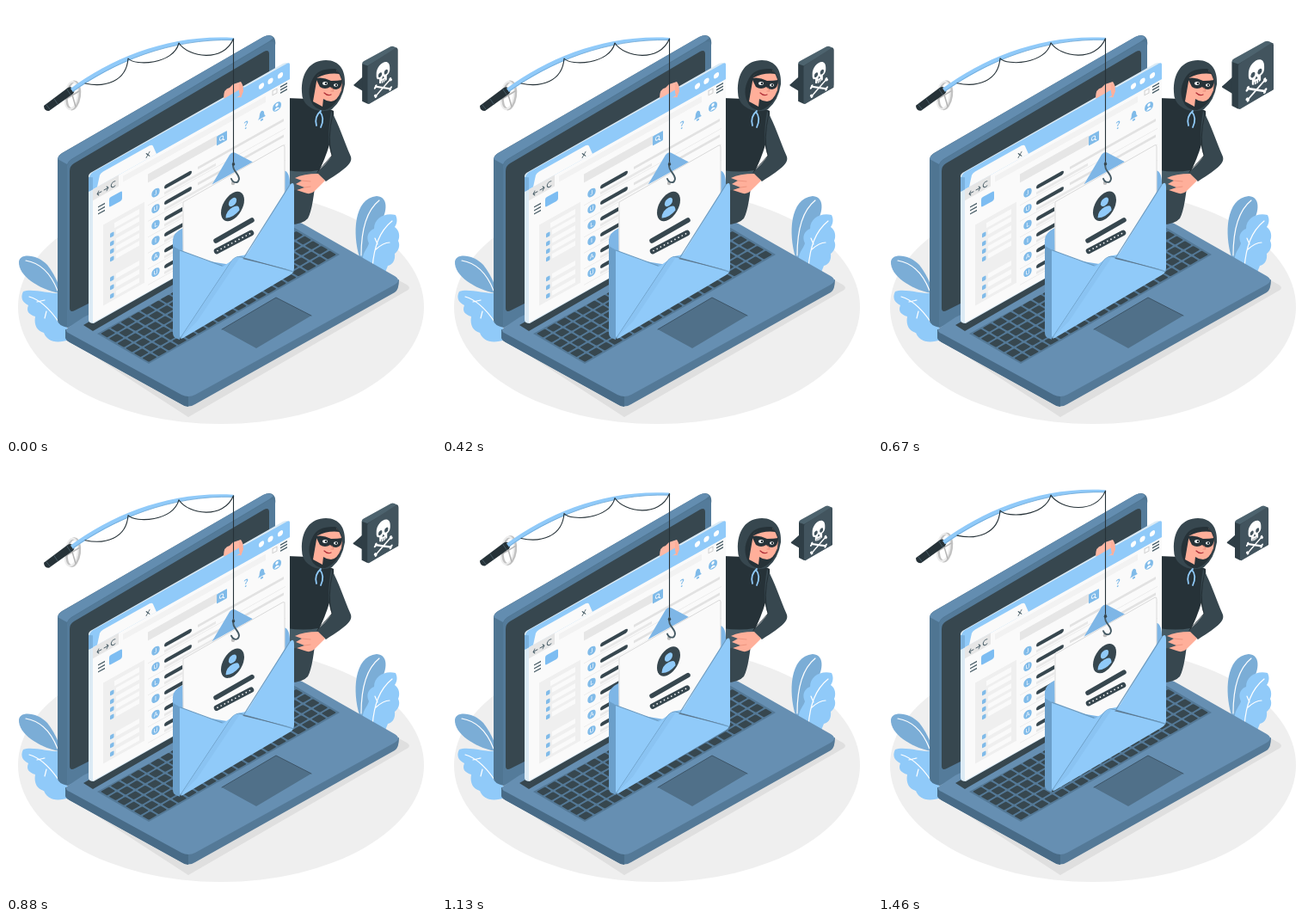
Animation of 500 by 500 pixels, one loop 1500 ms. Source, as an HTML page:

```html
<!DOCTYPE html>
<html lang="en">
<head>
<meta charset="utf-8">
<title>Phishing</title>
<style>
  html, body { margin: 0; width: 100%; height: 100%; overflow: hidden; background: #fff; }
  svg { display: block; width: 100vw; height: 100vh; }
  text { font-family: Lato, Arial, sans-serif; text-anchor: middle; }
  .line { fill: none; stroke-linecap: round; stroke-linejoin: round; }
</style>
</head>
<body>
<svg viewBox="0 0 500 500">
  <ellipse cx="250" cy="350" rx="236" ry="136" fill="#efefef"/>
  <path d="M70 386L212 478L466 331Q472 328 466 324L440 310Z" fill="#dfdfdf"/>

  <g id="plants">
    <path d="M62 334C38 329 14 314 15 297C17 286 38 290 48 301Q56 311 62 326Z" fill="#7badd6"/>
    <path d="M20 332C16 340 20 345 26 348C23 355 27 359 34 361C32 372 37 378 44 380C48 390 58 393 74 388L62 334C52 335 30 328 20 332Z" fill="#90caf9"/>
    <path d="M411 292C403 265 404 224 431 221C447 222 442 244 434 254C430 264 424 276 423 300Z" fill="#7badd6"/>
    <path d="M415 300C413 287 420 283 422 276C418 268 422 261 428 259C428 247 440 240 453 243C456 249 454 254 452 257C458 261 458 269 456 273C459 279 456 285 452 288C453 296 449 301 444 302L440 312Z" fill="#90caf9"/>
    <path class="line" d="M23 296C42 299 53 313 60 331M27 338C41 342 52 354 61 367M36 344L45 342M47 355L45 363M434 226C419 238 413 262 413 290M449 250C434 262 428 280 426 304M432 277L429 270M430 283Q439 275 446 275" stroke="#fff" stroke-width="1.2"/>
  </g>

  <g id="laptop">
    <path d="M60 179Q60 174 65 171L299 36Q307 32 311 36Q314 39 313 46V250L72 374Q60 371 60 366Z" fill="#4f7592"/>
    <path d="M64 172L299 36Q307 32 311 37L306 41L76 178Q72 181 71 184L60 178Q61 174 64 172Z" fill="#638db0"/>
    <path d="M71 186Q72 181 77 178L306 42Q313 39 313 47V250L71 374Z" fill="#547b9a"/>
    <path d="M74 192Q74 186 79 183L300 53Q306 50 306 56V240L80 354Q74 357 74 351Z" fill="#37474f"/>
    <path d="M69 376V386Q70 389 74 391L204 463Q212 468 220 463L452 333Q457 330 457 318L212 440Z" fill="#547997"/>
    <path d="M69 376V386Q70 389 74 391L204 463Q208 466 212 466V450Z" fill="#486b87"/>
    <path d="M72 374L90 362L322 250Q337 248 350 256L452 314Q460 319 452 324L220 452Q212 456 204 452L74 381Q67 378 72 374Z" fill="#668fb2"/>
    <path d="M90 371L101 378L334 243V230Z" fill="#37474f"/>
    <path d="M106 381L166 416L388 289L334 257Z" fill="#547997"/>
    <g id="keys" transform="matrix(11.58 -6.63 9.67 5.67 108 381)" fill="#37474f"/>
    <path d="M251 376L314 339L355 360L291 398Z" fill="#507089"/>
    <path class="line" d="M251 376L314 339L355 360" stroke="#3d5568"/>
  </g>

  <g id="thief">
    <path d="M326 195H361C358 220 356 238 351 247Q344 255 326 254Z" fill="#37474f"/>
    <path d="M326 107L352 108L381 122C383 146 374 172 362 196L326 194Z" fill="#263238"/>
    <path d="M326 191Q347 194 363 191L361 203Q348 213 326 216Z" fill="#455a64"/>
    <path d="M378 122C387 137 393 157 400.500 174C404 182 397 188 372 204L361 194Q372 184 379 174Q372 158 378 122Z" fill="#37474f"/>
    <path class="line" d="M380 125Q373 156 379 174L362 193" stroke="#1d272c" stroke-width=".8"/>
    <path d="M363 195L371 203Q364 210 359 215Q354 220 347 217L338 214L347 211L337 207L344 203L336 200Q346 195 363 195Z" fill="#ffaf9a"/>
    <path class="line" d="M347 211L354 210M344 203L354 204" stroke="#e58a75" stroke-width=".7"/>
    <path d="M344 100C343 77 354 63 372 63C388 63 395 75 394 91Q391 110 379 120Q364 126 351 116Q344 110 344 100Z" fill="#37474f"/>
    <path d="M357 115Q348 100 357 84Q363 72 383 73Q394 82 390 99Q385 116 371 121Q362 121 357 115Z" fill="#263238"/>
    <path d="M362 82Q366 75 384 75Q393 84 390 98Q385 111 378 111Q373 111 369 108L368 117L357 111Z" fill="#ffaf9a"/>
    <path d="M361 84Q364 74 383 74L388 79Q374 77 361 84Z" fill="#263238"/>
    <path d="M360 84Q369 82 378 87Q386 87 391 86Q391 96 384 97Q379 97 377 94Q371 98 365 94Z" fill="#263238"/>
    <ellipse cx="371" cy="90" rx="2.900" ry="1.900" fill="#fff"/><circle cx="372" cy="90" r="1.300" fill="#263238"/>
    <ellipse cx="383.500" cy="92" rx="2.500" ry="1.800" fill="#fff"/><circle cx="384" cy="92" r="1.200" fill="#263238"/>
    <path class="line" d="M379 95L381 99L378 99" stroke="#e58a75" stroke-width=".8"/>
    <path class="line" d="M370 101Q374 105 378 103" stroke="#b02f38" stroke-width="1.200"/>
    <path class="line" d="M366 122Q358 129 361 139M365 123Q371 130 366 141" stroke="#90caf9" stroke-width="1.800"/>
  </g>

  <path d="M96 198Q96 195 100 193L322 67Q329 64 330 69V240L102 369Q96 369 96 365Z" fill="#dcebf5"/>
  <g id="window" transform="matrix(1 -.56 0 1 98 197)">
    <path d="M3 1H232V173H3Z" fill="#fafafa"/>
    <path d="M-1 1Q0-2 3-2H229Q232-2 232 1V18H-1Z" fill="#90caf9"/>
    <path d="M-2 1L3 4V18H-2Z" fill="#7bb2df"/>
    <path d="M8 18L11 6Q12 4 15 4H69Q72 4 73 7L77 18Z" fill="#fafafa"/>
    <rect x="3" y="18" width="30" height="13" fill="#e6e6e6"/>
    <path class="line" transform="translate(0 1)" d="M65 10L69 15M69 10L65 15M13 25H8L10 22.500M8 25L10 27.500M16 25H21L19 22.500M21 25L19 27.500M29 22A3 3 0 1 0 29 27" stroke="#455a64" stroke-width=".9"/>
    <path d="M38 22H204V29H38Z" fill="#f2f2f2"/>
    <rect x="212" y="20.500" width="5" height="5" fill="none" stroke="#d0d0d0"/>
    <path d="M221 21h8m-8 3.500h8m-8 3.500h8M9 42h8m-8 4h8m-8 4h8" stroke="#455a64" stroke-width="1.300"/>
    <rect x="22" y="38.500" width="15" height="11" rx="2" fill="#7dbdf2"/>
    <path d="M67 36H147V46H67Z" fill="#e6e6e6"/>
    <rect x="147" y="37" width="12" height="11" rx="1" fill="#80bbe9"/>
    <circle cx="152.500" cy="42" r="2.200" fill="none" stroke="#fff" stroke-width=".8"/>
    <path d="M154 44l2 2" stroke="#fff"/>
    <text x="181" y="47" font-size="12" font-weight="700" fill="#80bbe9">?</text>
    <path d="M195 45Q197 43 197 39Q199 34 202 39Q202 43 204 45ZM198 46h3v2h-3Z" fill="#80bbe9"/>
    <circle cx="217" cy="41.500" r="5" fill="#80bbe9"/>
    <path d="M214 45Q217 40 220 45Z" fill="#fff"/><circle cx="217" cy="39.500" r="1.700" fill="#fff"/>
    <path d="M15 66H63V160H15Z" fill="#efefef"/>
    <path d="M28 71H57V77H28Z" fill="#fafafa"/>
  </g>
  <path d="M253 107Q253 96 260 95L264 91L273 88Q276 92 276 98L273 106Q264 106 258 110Z" fill="#ffb8a5"/>
  <path d="M253 108L277 94V101L255 114Z" fill="#90caf9"/>
  <path d="M271 90Q276 91 276 99L273 107Q270 101 271 90Z" fill="#ffaf9a"/>

  <g id="catch">
    <g id="envelope">
      <path d="M237 212L260 173Q263 169 267 171L288 182L280 215Z" fill="#7eb6e6"/>
      <path d="M194 272Q194 264 206 258L318 193Q329 187 330 205V300L202 320L194 282Z" fill="#7eb6e6"/>
      <path d="M205 228L208 225L322 162Q324 161 324 164V240L268 302L206 292Z" fill="#fafafa"/>
      <path class="line" d="M206 290V228L322 162Q324 161 324 164V220" stroke="#dadada"/>
      <g transform="matrix(1 -.55 0 1 263.500 233)">
        <ellipse rx="13.500" ry="15.500" fill="#37474f"/>
        <circle cy="-5" r="4.600" fill="#90caf9"/>
        <path d="M-8 9Q-8 1 0 1Q8 1 8 9Q0 14-8 9Z" fill="#90caf9"/>
      </g>
      <path class="line" d="M244 273L286 249" stroke="#37474f" stroke-width="5.500"/>
      <path class="line" d="M245 285L285 264" stroke="#37474f" stroke-width="6.500"/>
      <path class="line" d="M246 284.500L284 264.500" stroke="#fff" stroke-width="1.700" stroke-dasharray="0 4.700"/>
      <path d="M194 278L202 284V388L197 386Q194 384 194 380Z" fill="#6b9fca"/>
      <path d="M202 284L252 303L270 291L280 289L329 209Q335 202 335 211V305Q335 310 330 313L206 386Q202 388 202 384Z" fill="#90caf9"/>
      <path class="line" d="M202 284L251 302M277 292L330 208M203 386L262 297Q268 289 277 293L334 309" stroke="#6b9bc1" stroke-width="1.200"/>
      <path d="M203 386L262 297Q266 291 272 292L222 367Z" fill="#8ac3f2"/>
      <path d="M277 293L334 308L325 306L275 294Z" fill="#5c758a"/>
      <path d="M194 279Q193 270 199 267V282Z" fill="#7eb6e6"/>
    </g>
    <g id="rod">
      <ellipse cx="78" cy="104" rx="7.500" ry="16" fill="none" stroke="#c2c2c2" stroke-width="3" transform="rotate(8 78 104)"/>
      <ellipse cx="76" cy="104" rx="7.500" ry="16" fill="none" stroke="#ededed" stroke-width="2" transform="rotate(8 76 104)"/>
      <path class="line" d="M70 108L85 99M74 93L81 117" stroke="#b5b5b5" stroke-width="1.500"/>
      <path d="M44 116L72 95Q76 93 79 97Q80 100 78 102L50 122Q44 122 44 116Z" fill="#263238"/>
      <path class="line" d="M47 115L51 120M56 108L60 114M71 97L75 103" stroke="#455a64"/>
      <path d="M75 96C124 60 190 33 264 37Q267 38.500 264 40C190 37 126 66 78 100Z" fill="#90caf9"/>
      <path class="line" d="M78 99C126 65 190 38 264 39.500" stroke="#6ea6d4" stroke-width=".8"/>
      <path class="line" d="M92 90C115 95 140 88 142 61C150 70 195 68 201 43C212 60 253 66 264.500 38V182" stroke="#263238" stroke-width="1.100"/>
      <circle cx="264" cy="206" r="2.200" fill="#bdbdbd"/>
      <path class="line" d="M264.500 182C262 192 271 194 271 201C270 207 264 206 262 201" stroke="#455a64" stroke-width="1.900"/>
      <circle cx="264.500" cy="184" r="1.800" fill="#37474f"/>
    </g>
  </g>

  <g id="bubble">
    <path d="M406 92Q405 91 407 90L416 82V98Z" fill="#2f3e46"/>
    <path d="M415 68L448 49L454 52V94L421 112L415 109Z" fill="#2f3e46"/>
    <path d="M415 68Q415 66 417 65L446 49Q448 48 450 49L454 51L421 70Z" fill="#4d636e"/>
    <path d="M421 72Q421 70 423 69L451 51Q454 49 454 53V91Q454 94 452 95L423 112Q421 113 421 110Z" fill="#42545e"/>
    <g transform="matrix(.92 -.46 0 .92 437.500 82)">
      <path class="line" d="M-8 8L9 19M-8 19L9 8" stroke="#fff" stroke-width="2"/>
      <path class="line" d="M-9 9h0M-8 7h0M10 18h0M9 20h0M-9 18h0M-8 20h0M10 9h0M9 7h0" stroke="#fff" stroke-width="2.800"/>
      <path d="M-7.500-6C-8-20 9-20 8.500-6Q9 0 5 1V6Q0 9-4 6V1Q-8 0-7.500-6Z" fill="#fff"/>
      <ellipse cx="-3" cy="-3.500" rx="2.200" ry="2.700" fill="#42545e"/>
      <ellipse cx="4" cy="-3.500" rx="2.200" ry="2.700" fill="#42545e"/>
      <path d="M.5-.5L2 2.500H-1ZM-2 4.500v3h.7v-3ZM.2 4.500v3h.7v-3ZM2.400 4.500v3h.7v-3Z" fill="#42545e"/>
    </g>
  </g>
</svg>
<script>
  const $ = id => document.getElementById(id);
  const add = (id, markup) => $(id).insertAdjacentHTML('beforeend', markup);
  const rect = (x, y, w, h, fill, r = 0) =>
    `<rect x="${x}" y="${y}" width="${w}" height="${h}" rx="${r}" fill="${fill}"/>`;

  for (let row = 0; row < 6; row++)
    for (let col = 0; col < 19; col++)
      add('keys', `<rect x="${col + .09}" y="${row + .1}" width=".82" height=".8" rx=".1"/>`);

  for (const x of [199, 209.5, 221])
    add('window', `<circle cx="${x}" cy="7.500" r="3.100" fill="#fff"/>`);

  for (const y of [83, 93, 102, 111, 134, 144, 154])
    add('window', rect(23, y - 2.5, 4.5, 5, '#80bbe9', 1) + rect(30, y - 3, 27, 5.5, '#fafafa'));

  [...'JULIAU'].forEach((letter, i) => {
    const y = 62.6 + i * 18.5;
    add('window',
      `<circle cx="76" cy="${y}" r="4.700" fill="#80bbe9"/>` +
      `<text x="76" y="${y + 2.4}" font-size="7" fill="#fff">${letter}</text>` +
      rect(86, y - 2.7, 32, 4.6, '#37474f', 2.3) +
      rect(125, y - 2.5, 100, 3, '#e2e2e2') +
      rect(86, y + 5, 60, 3, '#e8e8e8') +
      rect(67, y + 9.5, 160, .7, '#e8e8e8'));
  });

  const LOOP = 1500;

  // Double beat: two peaks of 1.3, then rest
  function beat(p) {
    if (p < .28) return 1.3 - .3 * Math.abs(p - .14) / .14;
    if (p < .42) return 1 + .3 * (p - .28) / .14;
    return Math.max(1, 1.3 - .3 * (p - .42) / .28);
  }

  // The catch starts to rise partway through the loop
  const lift = t => t < 530 ? 0 : 5 * (1 - Math.cos(Math.PI * (t - 530) / 1500));

  const start = performance.now();
  function draw() {
    const t = (performance.now() - start) % LOOP;
    const scale = beat((t + 40) % LOOP / LOOP);
    $('bubble').setAttribute('transform', `translate(429.7 80.500) scale(${scale}) translate(-429.7 -80.500)`);
    $('catch').setAttribute('transform', `translate(0 ${-lift(t)})`);
    requestAnimationFrame(draw);
  }
  draw();
</script>
</body>
</html>
```
